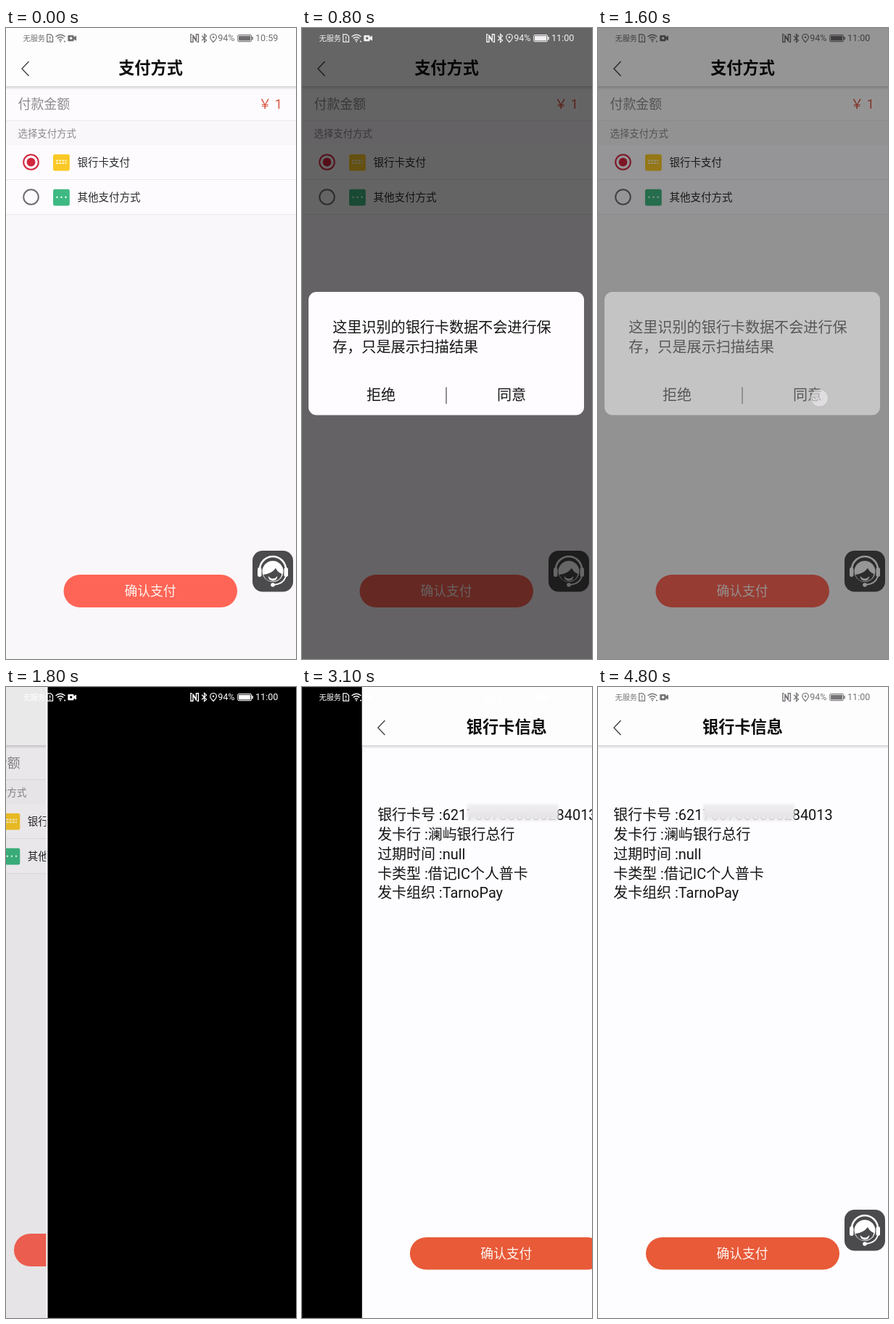
Write an HTML page that moves like this. It is 400 px wide and 868 px high and loops after 4900 ms.

```html
<!DOCTYPE html>
<html lang="zh-CN">
<head>
<meta charset="utf-8">
<title>支付方式</title>
<style>
  html, body { margin: 0; width: 100%; height: 100%; overflow: hidden; background: #000; }
  svg { display: block; width: 400px; height: 868px; }
  text { font-family: Roboto, "Noto Sans CJK SC", "Noto Sans CJK", sans-serif; white-space: pre; }
</style>
</head>
<body>
<svg id="stage" viewBox="0 0 400 868" xmlns="http://www.w3.org/2000/svg">
  <defs>
    <linearGradient id="shade" x2="0" y2="1">
      <stop offset="0" stop-color="#d6d3d6"/>
      <stop offset="1" stop-color="#d6d3d6" stop-opacity="0"/>
    </linearGradient>
    <linearGradient id="veil" x2="0" y2="1">
      <stop offset="0" stop-color="#f1eff1"/>
      <stop offset=".7" stop-color="#e6e4e6"/>
      <stop offset="1" stop-color="#f4f2f4" stop-opacity=".8"/>
    </linearGradient>
    <filter id="soft"><feGaussianBlur stdDeviation="1.6"/></filter>
    <g id="back"><path d="M31.5 46 22 56l9.5 10" fill="none" stroke="#444" stroke-width="1.4"/></g>
    <g id="help">
      <rect x="340" y="719" width="56" height="56.5" rx="14" fill="#4b4a4c"/>
      <path d="M350 745a18 18 0 0 1 36 0" fill="none" stroke="#fff" stroke-width="2.6"/>
      <rect x="347" y="742" width="5.5" height="13" rx="2.7" fill="#fff"/>
      <rect x="383.5" y="742" width="5.5" height="13" rx="2.7" fill="#fff"/>
      <circle cx="368" cy="747.5" r="14.5" fill="#fff"/>
      <path d="M355 752q11-1 17-9 3 6 8.500 8-1.500 9-12.500 10.500-10-.5-13-9.500z" fill="#4b4a4c"/>
      <path d="M361.5 754q6.500 7 13 0-1 6.500-6.500 6.500t-6.500-6.500z" fill="#fff"/>
      <path d="M386 754q-3 11-17 12" fill="none" stroke="#fff" stroke-width="1.8"/>
      <circle cx="368" cy="766" r="2.8" fill="#fff"/>
    </g>
  </defs>
  <g id="pay"></g>
  <rect id="dim" width="400" height="868"/>
  <g id="dialog"></g>
  <circle id="touch" cx="305.5" cy="509" r="12" fill="#f4f2f4" fill-opacity=".55" stroke="#aaa" stroke-opacity=".5"/>
  <g id="scan">
    <rect width="400" height="868"/>
    <rect x=".5" y=".5" width="399" height="867" fill="none" stroke="#101010"/>
    <rect id="edge" x="-2" width="2" height="868" fill="#fff"/>
  </g>
  <g id="result"></g>
  <g id="status"></g>
</svg>
<script>
const LOOP = 4900, STEP = 100;
const el = id => document.getElementById(id);

const label = (x, y, size, color, str, extra = "") =>
  `<text x="${x}" y="${y}" font-size="${size}" fill="${color}" ${extra}>${str}</text>`;
const box = (x, y, w, h, fill, r = 0) =>
  `<rect x="${x}" y="${y}" width="${w}" height="${h}" rx="${r}" fill="${fill}"/>`;
const middle = 'text-anchor="middle"';

const header = title =>
  box(0, 80, 400, 5, "url(#shade)") + box(0, 0, 400, 80, "#fefdfe") +
  '<use href="#back"/>' +
  label(199.5, 63, 22.2, "#0c0c0c", title, middle + ' font-weight="700"');

const button = (x, y, w, h, color) =>
  box(x, y, w, h, color, h / 2) +
  label(199, y + h / 2 + 6.8, 17.8, "#fff4f1", "确认支付", middle);

const radio = (y, color, on) =>
  `<circle cx="34.5" cy="${y}" r="10.3" fill="none" stroke="${color}" stroke-width="2"/>` +
  (on ? `<circle cx="34.5" cy="${y}" r="5.9" fill="${color}"/>` : "");

const dots = [70.5, 76.5, 82.5].map(x => `<circle cx="${x}" cy="232.7" r="1.2" fill="#e6fff3"/>`).join("");

el("pay").innerHTML =
  box(0, 0, 400, 868, "#faf7fa") + box(0, 80, 400, 47, "#fdfbfd") +
  box(0, 161, 400, 95, "#fdfbfe") +
  [127, 208, 256].map(y => box(0, y, 400, 1, "#ebe8eb")).join("") +
  header("支付方式") +
  label(16.5, 110.7, 17.9, "#8c8a8c", "付款金额") +
  label(348.3, 110.5, 18, "#da5740", "￥ 1") +
  label(16.5, 150.3, 13.4, "#8c8a8c", "选择支付方式") +
  radio(184.5, "#d2263e", true) + radio(232.5, "#716b70", false) +
  box(65, 173.8, 22.8, 22.8, "#fbc926", 2.5) +
  '<path d="M69 182.5h14.5M69 186h14.5" stroke="#fff3c0" stroke-width="2.2" stroke-dasharray="3 1.2"/>' +
  box(65, 221.8, 22.8, 22.8, "#3eb983", 2.5) + dots +
  label(98.4, 190.4, 14.5, "#2b2a2b", "银行卡支付") +
  label(98.4, 238.4, 14.5, "#2b2a2b", "其他支付方式") +
  button(79.5, 752, 239.5, 45, "#ff6556") + '<use href="#help"/>';

el("dialog").innerHTML =
  box(9, 363, 380, 169.5, "#fefcfe", 11) +
  label(42.2, 418.5, 20.1, "#161516", "这里识别的银行卡数据不会进行保") +
  label(42.2, 445.5, 20.1, "#161516", "存，只是展示扫描结果") +
  label(109, 511.5, 20.1, "#161516", "拒绝", middle) +
  label(289, 511.5, 20.1, "#161516", "同意", middle) +
  box(198.2, 494, 1.6, 23, "#777");

const details = [
  "银行卡号 :6217007000000284013",
  "发卡行 :澜屿银行总行",
  "过期时间 :null",
  "卡类型 :借记IC个人普卡",
  "发卡组织 :TarnoPay"
];
el("result").innerHTML =
  box(0, 0, 400, 868, "#fdfcfe") + header("银行卡信息") +
  details.map((s, i) => label(21.3, 183.2 + i * 26.8, 19.95, "#161516", s)).join("") +
  '<rect x="145" y="161" width="126" height="24" fill="url(#veil)" filter="url(#soft)"/>' +
  button(66, 757, 267, 44.5, "#e85a38") + '<use href="#help"/>';

el("status").innerHTML =
  label(23.5, 17.8, 10.2, "currentColor", "无服务") +
  `<g fill="none" stroke="currentColor" stroke-width="1.2">
    <path d="M56.7 8.8h5l2.800 2.800v7.600h-7.800zM60.6 11.5v3.500M60.6 16.2v1.500"/>
    <path d="M68.5 12q6.500-5.600 13 0M70.7 14.4q4.300-3.700 8.600 0M72.9 16.7q2.100-1.800 4.200 0" stroke-width="1.3"/>
    <path d="M270 10.8l6.500 6.200-3 2.600V8.400l3 2.600-6.500 6.200"/>
    <path d="M286 19.5q-4.300-4.300-4.300-6.700a4.300 4.300 0 0 1 8.600 0q0 2.400-4.300 6.700z"/>
    <path d="M256.5 8.800h-1.600v10.400h3V11l4.600 7M263.500 19.200h1.900V8.800h-3v8.200l-4.500-7" stroke-width="1.4"/>
    <rect x="319.7" y="9.5" width="18.8" height="9.2" rx="1.5" stroke-width="1"/>
  </g>
  <g fill="currentColor">
    <circle cx="75" cy="18.5" r="1"/><circle cx="81" cy="18.5" r="1"/><circle cx="286" cy="12.8" r="1.3"/>
    <path fill-rule="evenodd" d="M86.3 10h6.200q1 0 1 1v1.600l3.500-2v7l-3.500-2v1.700q0 1-1 1h-6.200q-1 0-1-1V11q0-1 1-1zM88 14a1.700 1.700 0 1 0 3.400 0 1.700 1.700 0 1 0-3.400 0z"/>
    <rect x="321" y="10.8" width="16.2" height="6.6"/><rect x="339.3" y="12" width="1.5" height="4.3"/>
  </g>` +
  label(292.3, 18.4, 12.5, "currentColor", "94%") +
  label(344, 18.4, 12.6, "currentColor", "", 'id="clock"');

// Last row at or before t wins: [time, ...values]
const pick = (rows, t) => rows.filter(r => r[0] <= t).pop();
const shades = [[0, 0, 0], [700, .35, .55], [800, .6, 1], [1500, .57, .92], [1600, .41, .47], [1700, .09, 0], [1800, .08, 0]];
const inks = [[0, "#716e71"], [700, "#f2f0f2"], [1600, "#413f41"], [1700, "#fff"], [3200, "#777477"]];

// Left edge of a page that enters from the right and slows down
const enter = (t, start) => {
  if (t < start) return 400;
  const x = 400 * Math.pow(.35, (t - start) / 100);
  return x < 1 ? 0 : x;
};
const slide = (id, x) => el(id).setAttribute("transform", `translate(${x.toFixed(2)} 0)`);
const show = (id, on) => { el(id).style.display = on ? "" : "none"; };

function draw(t) {
  const scanX = enter(t, 1615), resultX = enter(t, 2950);
  const [, dim, dialog] = pick(shades, t);
  slide("scan", scanX);
  slide("pay", (scanX - 400) * .2);
  slide("result", resultX);
  show("scan", scanX < 400);
  show("result", resultX < 400);
  show("touch", t >= 1500 && t < 1700);
  el("dim").setAttribute("opacity", dim);
  el("dialog").setAttribute("opacity", dialog);
  el("status").setAttribute("color", pick(inks, t)[1]);
  el("clock").textContent = t < 300 ? "10:59" : "11:00";
}

const start = performance.now();
function tick() {
  const t = (performance.now() - start) % LOOP;
  draw(Math.floor(t / STEP) * STEP);
  requestAnimationFrame(tick);
}
tick();
</script>
</body>
</html>
```
